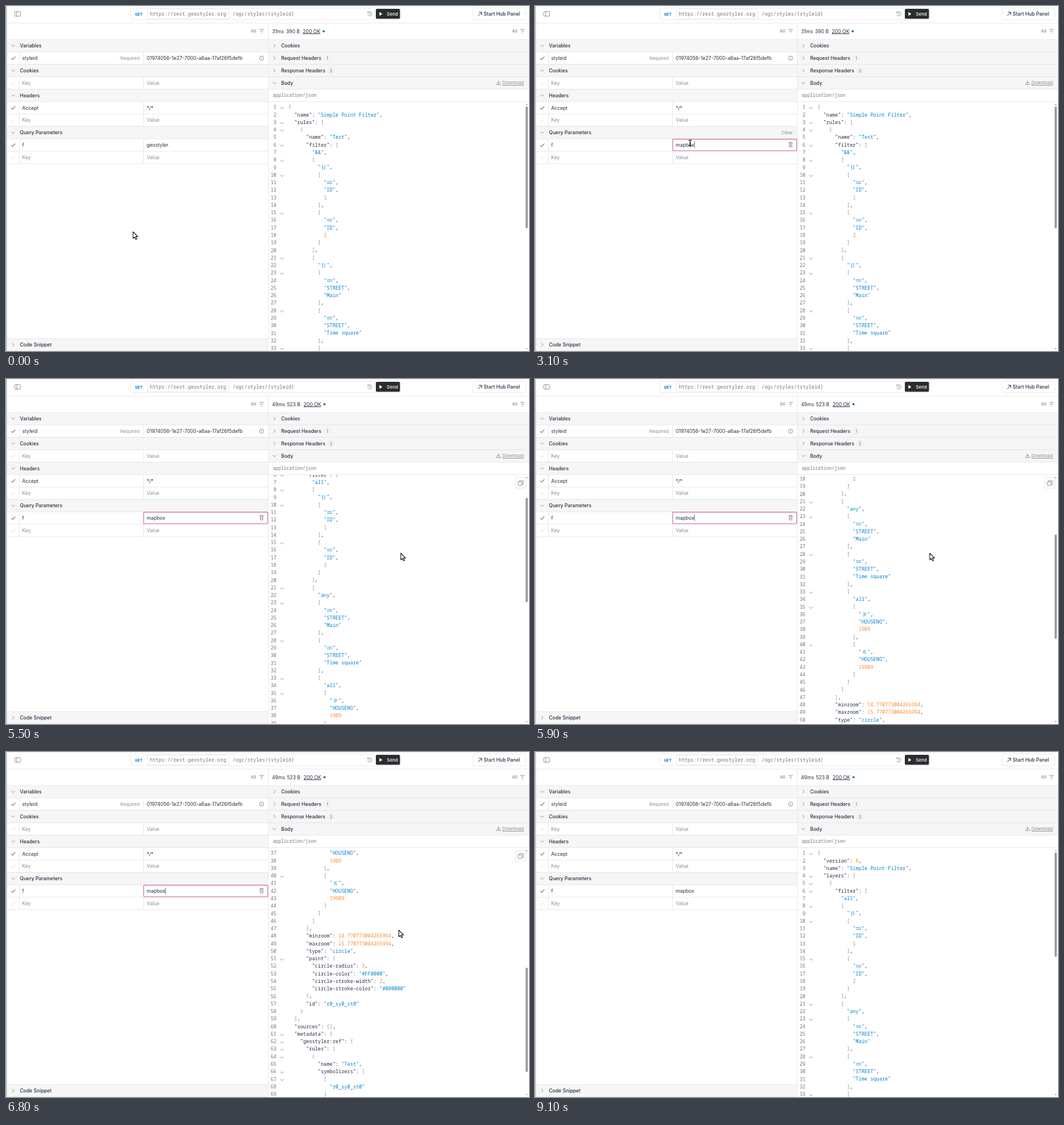
Recreate the animation shown at these times as an HTML page. Size 922 by 608 pixels, loop 9300 ms.

```html
<!DOCTYPE html>
<html lang="en">
<head>
<meta charset="utf-8">
<title>API request demo</title>
<style>
html, body { margin: 0; width: 100%; height: 100%; overflow: hidden; background: #fff; }
svg { display: block; }
text { font: 8.63px Inter, sans-serif; fill: #2a2f45; white-space: pre; }
.s { font-size: 8px; }
.h { font-weight: 500; }
.m { font-family: "Noto Sans Mono", "DejaVu Sans Mono", monospace; }
.g { fill: #757575; }
.l { fill: #8e8e8e; }
.b { fill: #0082d0; }
.o { fill: #fb892c; }
.e { text-anchor: end; }
.c { text-anchor: middle; }
.w { fill: #fff; }
.i { fill: none; stroke: #757575; stroke-width: .8; }
.d { fill: none; stroke: #2a2f45; stroke-width: 1; }
.f { fill: none; stroke: #dcdcdc; stroke-width: .9; }
.r { fill: none; stroke: #e2e2e2; stroke-width: .8; }
.q { fill: none; stroke: #0082d0; stroke-width: .8; }
</style>
</head>
<body>
<svg id="stage" width="100%" height="100%" viewBox="0 0 922 608"></svg>
<script>
const CHAR = 5.178, LINE = 13.27, ROW = 21.88, LOOP = 9300;
const stage = document.getElementById('stage');
const $ = id => document.getElementById(id);
const esc = s => s.replace(/&/g, '&amp;').replace(/</g, '&lt;');
const rowY = k => 59.1 + ROW * k;

// Markup helpers; y of a text is its vertical centre
const text = (x, y, s, cls = '', attr = '') =>
  `<text x="${x}" y="${y + 3.1}" class="${cls}" ${attr}>${esc(s)}</text>`;
const path = (d, cls = 'i', attr = '') => `<path d="${d}" class="${cls}" ${attr}/>`;
const rect = (x, y, w, h, attr) => `<rect x="${x}" y="${y}" width="${w}" height="${h}" ${attr}/>`;
const chevron = (x, y, open) =>
  path(open ? `M${x - 3} ${y - 1.5}l3 3 3-3` : `M${x - 1.5} ${y - 3}l3 3-3 3`);
const check = (y, on) => path(`M9.3 ${y + .3}l2.3 2.4 4.8-5.3`, on ? 'd' : 'f');
const filterIcon = (x, y) => path(`M${x - 4} ${y - 3}h8M${x - 2.5} ${y}h5M${x - 1} ${y + 3}h2`);

function band(x, y, w, label, open) {
  return rect(x, y, w, ROW, 'fill="#f6f6f6"') + path(`M${x} ${y}h${w}M${x} ${y + ROW}h${w}`, 'r')
    + chevron(x + 10.7, y + 10.9, open) + text(x + 22.5, y + 10.9, label, 'h');
}
function entry(k, key, value, on) {
  const y = rowY(k), cy = y + 10.9, cls = on ? '' : 'l';
  return path(`M2 ${y + ROW}H462M23.5 ${y}v${ROW}M242.5 ${y}v${ROW}`, 'r')
    + check(cy, on) + text(28.5, cy, key, cls)
    + text(248, cy, value, cls, key == 'f' ? 'id="value"' : '');
}

// JSON listing
const ligatures = {
  '==': 'M.6-1.3h9.2M.6 1.5h9.2',
  '||': 'M3.5-4v8M6.9-4v8',
  '>=': 'M2.6-3.2l5.2 2-5.2 2M2.6 3.2l5.2-2',
  '<=': 'M7.8-3.2l-5.2 2 5.2 2M7.8 3.2l-5.2-2'
};
const token = /("[^"]*")(?=:)|("[^"]*")|(-?\d[\d.]*)|([[\]{}]+)|([^"\d[\]{}]+)/g;
const tokenClass = ['', 'b', 'o', 'l', ''];

function listing(doc) {
  return JSON.stringify(doc, null, 2).split('\n').map((line, i) => {
    const y = 9.3 + LINE * i, indent = line.search(/\S/), x = 498 + CHAR * indent;
    const op = /"(==|\|\||>=|<=)"/.exec(line);
    const spans = [...line.trim().replace(/"(==|\|\||>=|<=)"/, '"  "').matchAll(token)].map(m =>
      `<tspan class="${tokenClass[m.slice(1).findIndex(Boolean)]}">${esc(m[0])}</tspan>`);
    return text(476.8, y, `${i + 1}`, 'm g e')
      + (/[[{]$/.test(line) ? chevron(486.5, y + 1.5, true) : '')
      + `<text x="${x}" y="${y + 3}" class="m">${spans.join('')}</text>`
      + (op ? path(ligatures[op[1]], 'q', `transform="translate(${x + CHAR} ${y})"`) : '');
  }).join('');
}

const filter = (and, or) => [and,
  ['||', ['==', 'ID', 1], ['==', 'ID', 2]],
  [or, ['==', 'STREET', 'Main'], ['==', 'STREET', 'Time square'],
    [and, ['>=', 'HOUSENO', 1909], ['<=', 'HOUSENO', 19909]]]];
const name = 'Simple Point Filter', styleRef = 'r0_sy0_st0';
const before = { name, rules: [{ name: 'Test', filter: filter('&&', '||') }] };
const after = {
  version: 8, name,
  layers: [{
    filter: filter('all', 'any'),
    minzoom: 14.770773004265994, maxzoom: 15.770773004265994, type: 'circle',
    paint: { 'circle-radius': 3, 'circle-color': '#FF0000',
      'circle-stroke-width': 2, 'circle-stroke-color': '#000000' },
    id: styleRef
  }],
  sources: {},
  metadata: { 'geostyler:ref': { rules: [{ name: 'Test', symbolizers: [[styleRef]] }] } }
};

const status = (id, time, size, x) => `<g id="${id}">` + text(469, 44.5, time)
  + text(x - 29.5, 44.5, size) + text(x, 44.5, '200 OK') + path(`M${x} 48.9h30.5`, 'd', 'stroke-width=".7"')
  + `<circle cx="${x + 36.8}" cy="44.5" r="2" fill="#069061"/></g>`;
const badge = (x, y, s) =>
  `<circle cx="${x}" cy="${y}" r="5.6" class="r"/>` + text(x, y, s, 's c g');

const topBar = path('M0 .2H922', 'r')
  + rect(15.5, 9.8, 10, 8.2, 'rx="1.5" class="i"') + path('M19 9.8v8.2')
  + rect(219.8, 3.8, 475.5, 20.4, 'rx="3" class="r"')
  + text(234, 13.8, 'GET', 'm b c', 'style="font-size:7.3px;font-weight:700"')
  + rect(249.5, 5.3, 143, 17.2, 'rx="2" class="r"')
  + text(253.5, 13.8, 'https://rest.geostyler.org', 'm g')
  + text(399.5, 13.8, '/ogc/styles/{styleid}', 'm g')
  + path('M638 11.6a3.8 3.8 0 1 1-.4 3.5M637.6 9.8v2.2h2.2M641.2 11.8v2.4l1.7 1')
  + '<g id="send">' + rect(652, 5, 42.5, 17.6, 'rx="2.2" fill="#2a2c30"')
  + path('M658.3 10.6v6.6l5.2-3.3z', 'w') + text(671.3, 13.9, 'Send', 's w h') + '</g>'
  + rect(823.3, 3.6, 93, 20.8, 'rx="3" class="r"')
  + path('M832.5 17.5l6-6.3M833.6 11h5v5', 'd') + text(842, 13.9, 'Start Hub Panel', 'h')
  + path('M2 30H922', 'r');

const leftPane = text(431.5, 44.3, 'All', 's g') + filterIcon(450.7, 44.3)
  + band(2, rowY(0), 460, 'Variables', true)
  + entry(1, 'styleid', '01974056-1e27-7000-a6aa-17af26f5defb', true)
  + text(235.3, rowY(1) + 10.9, 'Required', 's l e')
  + '<circle cx="450.6" cy="91.9" r="3.7" class="i"/>' + path('M450.6 91.4v2.4M450.6 89.6v.9')
  + band(2, rowY(2), 460, 'Cookies', true) + entry(3, 'Key', 'Value')
  + band(2, rowY(4), 460, 'Headers', true) + entry(5, 'Accept', '*/*', true) + entry(6, 'Key', 'Value')
  + band(2, rowY(7), 460, 'Query Parameters', true)
  + rect(248, 239, 38.3, 11.5, 'id="select" fill="#d56199"')
  + entry(8, 'f', 'geostyler', true) + entry(9, 'Key', 'Value')
  + text(454.3, 223, 'Clear', 's l e', 'id="clear"')
  + path('M447 241.6h7.2M449 241.4v-1.2h3.2v1.2M448 241.8l.3 6.6h4.6l.3-6.6M449.8 243.6v3M451.4 243.6v3', 'i', 'id="trash"')
  + rect(242.7, 234.6, 218.8, 20.4, 'id="focus" rx="1.5" fill="none" stroke="#d56199" stroke-width="1.1"')
  + rect(0, 239, .8, 11.2, 'id="caret" fill="#2a2f45"')
  + band(2, 586, 460, 'Code Snippet', false);

const rightPane = text(892, 44.3, 'All', 's g') + filterIcon(910.5, 44.3)
  + status('status0', '31ms', '390 B', 523.3) + status('status1', '49ms', '523 B', 524.7)
  + band(462.5, rowY(0), 460, 'Cookies', false)
  + band(462.5, rowY(1), 460, 'Request Headers', false) + badge(566.4, 91.9, '1')
  + band(462.5, rowY(2), 460, 'Response Headers', false) + badge(572.8, 113.8, '3')
  + band(462.5, rowY(3), 460, 'Body', true)
  + path('M868.4 131.4v4.8M866.2 134.2l2.2 2.2 2.2-2.2M865 136.2v2.3h6.8v-2.3')
  + text(875, 135.3, 'Download', 's l') + path('M875 139.7h38', 'i', 'stroke="#8e8e8e"')
  + text(470.3, 157.2, 'application/json', 'm s g')
  + path('M462.5 168.5H922', 'r')
  + '<svg x="0" y="169" width="922" height="438">'
  + `<g id="doc0">${listing(before)}</g><g id="doc1">${listing(after)}</g></svg>`
  + path('M916.2 174.5l1.8-2 1.8 2zM916.2 603l1.8 2 1.8-2z', '', 'fill="#8e8e8e"')
  + rect(916.1, 177, 3.8, 215, 'id="thumb" rx="1.9" fill="#9a9a9a"')
  + '<g id="copy">' + rect(898, 174, 18.6, 18.2, 'rx="2" fill="#fff" stroke="#dcdcdc" stroke-width=".8"')
  + path('M905 181.2v-2h7v6.6h-2') + rect(902.8, 181.2, 7, 6.4, 'rx=".8" class="i"') + '</g>';

const pointers = path('M0 0V11.6L2.7 9.2 4.8 13.4 6.7 12.5 4.7 8.4H8.3Z', '',
    'id="arrow" fill="#fff" stroke="#111" stroke-width="1.1" stroke-linejoin="round"')
  + path('M-2.8-4.8h2q.8 0 .8 1V3.8q0 1-.8 1h-2M2.8-4.8h-2q-.8 0-.8 1M2.8 4.8h-2q-.8 0-.8-1M-1.6 0h3.2', '',
    'id="beam" fill="none" stroke="#111" stroke-width="1.2"');

stage.innerHTML = rect(0, 0, 922, 608, 'fill="#fff"') + topBar + leftPane + rightPane
  + path('M462.5 30V608', 'r') + rect(0, 0, 1.7, 608, 'fill="#c4c4c4"') + pointers;

// Motion: [time, values...]
const mouseKeys = [[200, 224, 398], [1000, 273.5, 241.5], [4800, 273.5, 241.5], [5400, 696, 307],
  [5900, 696, 307], [6100, 692.5, 314], [7400, 692.5, 314], [7900, 103, -10], [8300, 9, -11], [8500, 9, -30]];
const scrollKeys = [[5300, 0], [5900, 228], [6500, 477.7], [6900, 477.7], [7300, 180.5], [7600, 0]];
const typing = [[2000, 'm'], [2100, 'ma'], [2600, 'map'], [2800, 'mapb'], [3000, 'mapbo'], [3100, 'mapbox']];

function tween(keys, t, ease = u => u) {
  const i = keys.findIndex(k => k[0] > t);
  if (i < 1) return (i ? keys[keys.length - 1] : keys[0]).slice(1);
  const a = keys[i - 1], b = keys[i], u = ease((t - a[0]) / (b[0] - a[0]));
  return a.slice(1).map((v, n) => v + (b[n + 1] - v) * u);
}
const smooth = u => u * u * (3 - 2 * u);
const show = (id, on) => $(id).style.display = on ? '' : 'none';

function draw(now) {
  const t = Math.floor(now % LOOP / 100) * 100;
  const [x, y] = tween(mouseKeys, t, smooth), [scroll] = tween(scrollKeys, t);
  const focused = t >= 1200 && t < 9100, selected = t >= 1300 && t < 2000;
  const loaded = t >= 4200, overCode = x > 463 && y > 169;
  const overQuery = x < 462 && y > 212 && y < 278;

  const typed = typing.filter(k => k[0] <= t).pop();
  const value = $('value');
  const label = typed ? typed[1] : 'geostyler';
  if (value.textContent != label) value.textContent = label;
  value.style.fill = selected ? '#fff' : '';
  const width = value.getComputedTextLength();
  $('select').setAttribute('width', width);
  $('caret').setAttribute('x', 248 + width);
  const blinkOn = t < 3200 || Math.floor((t - 3200) / 600) % 2 == 0;
  show('caret', focused && !selected && blinkOn);
  show('select', selected);
  show('focus', focused);
  show('trash', focused || overQuery && y > 234 && y < 256);
  show('clear', overQuery);

  $('send').style.opacity = t == 4100 ? .8 : 1;
  for (const part of ['status', 'doc']) {
    show(part + 0, !loaded);
    show(part + 1, loaded);
  }
  $('doc1').setAttribute('transform', `translate(0 ${-scroll})`);
  $('thumb').setAttribute('y', 177 + scroll * .425);
  $('thumb').setAttribute('height', loaded ? 184 : 215);
  show('copy', overCode);

  const inField = t >= 1000 && t < 4900;
  show('beam', inField);
  show('arrow', !inField && t < 8500);
  $(inField ? 'beam' : 'arrow').setAttribute('transform', `translate(${x} ${y})`);
}

const start = performance.now();
function frame() {
  draw(performance.now() - start);
  requestAnimationFrame(frame);
}
frame();
</script>
</body>
</html>
```
